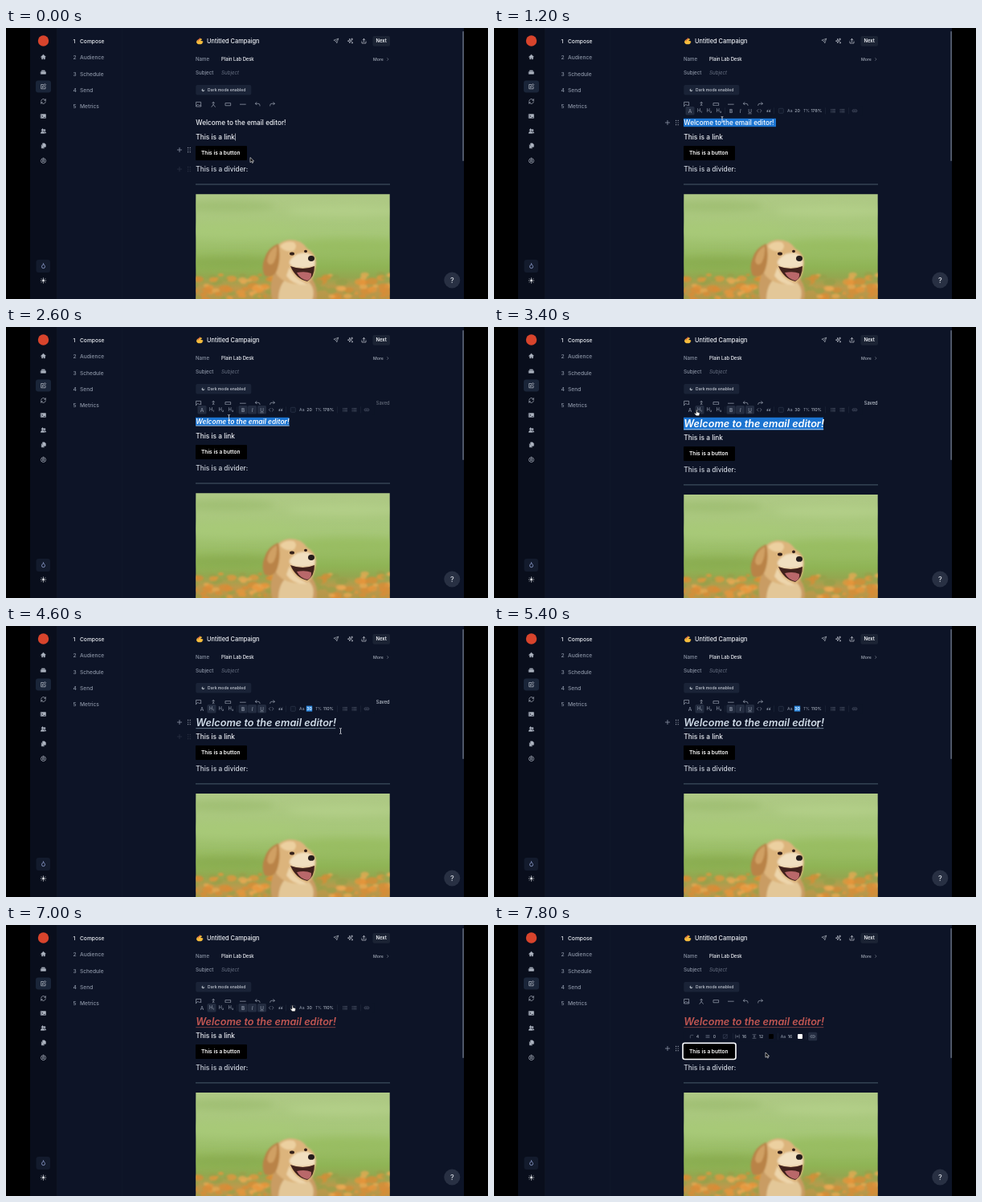
Recreate the animation shown at these times as an HTML page. Size 600 by 338 pixels, loop 8 s.

```html
<!DOCTYPE html>
<html lang="en">
<head>
<meta charset="utf-8">
<title>Email editor</title>
<style>
html, body { margin: 0; width: 100%; height: 100%; overflow: hidden; background: #000; }
svg { display: block; width: 600px; height: 338px; font-family: Inter, sans-serif; }
text { white-space: pre; }
</style>
</head>
<body>
<svg id="stage" viewBox="0 0 600 338"></svg>
<script>
const PAGE = '#0d1427', WHITE = '#eef1f6', GREY = '#8b94a5', DIM = '#596275', BLUE = '#1b74d1';

const ICONS = {
  home: 'M3 12 12 3l9 9h-3v9h-4v-6h-4v6H6v-9z',
  box: 'M2 11h20v9H2zM6 5h12v3H6z',
  edit: 'M11 4H3v17h17v-8M19 2l3 3-10 10-4 1 1-4z',
  refresh: 'M3 11a9 9 0 0 1 15-6l3 3M21 3v5h-5M21 13a9 9 0 0 1-15 6l-3-3M3 21v-5h5',
  screen: 'M2 4h20v16H2z',
  users: 'M9 4a4 4 0 1 1-.1 0zM2 20q0-6 7-6t7 6zM17 6a3 3 0 1 1-.1 0zM19 15q3 1 3 5h-3z',
  copy: 'M10 2h7l4 4v10H10zM5 8v13h10',
  buoy: 'M12 2a10 10 0 1 0 .1 0zM12 8a4 4 0 1 0 .1 0zM5 5l4 4M15 15l4 4M19 5l-4 4M9 15l-4 4',
  flame: 'M12 3c1 4 6 6 6 11a6 6 0 0 1-12 0c0-3 2-4 2-6 2 1 3 2 4-5z',
  sun: 'M12 8a4 4 0 1 0 .1 0zM12 1v3M12 20v3M1 12h3M20 12h3M4 4l2 2M18 18l2 2M20 4l-2 2M6 18l-2 2',
  moon: 'M20 14A9 9 0 1 1 10 4a7 7 0 0 0 10 10z',
  send: 'M22 2 11 13M22 2l-7 20-4-9-9-4z',
  sparkle: 'M10 4l2 6 6 2-6 2-2 6-2-6-6-2 6-2zM19 2v6M16 5h6M20 17v4M18 19h4',
  upload: 'M4 14v7h16v-7M12 16V3M7 8l5-5 5 5',
  image: 'M3 3h18v18H3zM3 18l6-6 5 5 3-3 4 4',
  merge: 'M5 22l7-9 7 9M12 13V3M8 7l4-4 4 4',
  pill: 'M2 7h20v10H2z',
  dash: 'M1 12h22',
  undo: 'M8 4 3 9l5 5M3 9h11a7 7 0 0 1 7 7v2',
  redo: 'M16 4l5 5-5 5M21 9H10a7 7 0 0 0-7 7v2',
  code: 'M8 6l-6 6 6 6M16 6l6 6-6 6',
  quote: 'M9 6q-6 2-6 11h5v-6H4M20 6q-6 2-6 11h5v-6h-4',
  list: 'M9 6h12M9 12h12M9 18h12M3 6h2M3 12h2M3 18h2',
  link: 'M8 12h8M10 7H7a5 5 0 0 0 0 10h3M14 7h3a5 5 0 0 1 0 10h-3',
  corner: 'M4 21V10q0-6 6-6h11',
  lines: 'M3 6h18M3 12h18M3 18h18',
  slash: 'M3 3h18v18H3zM3 21 21 3',
  padX: 'M3 4v16M21 4v16M8 12h8M12 9v6',
  padY: 'M4 3h16M4 21h16M12 7v10M9 12h6',
  chevron: 'M9 5l7 7-7 7'
};

const text = (x, cy, size, str, fill = WHITE, weight = 500, extra = '') =>
  `<text x="${x}" y="${cy + size * .36}" font-size="${size}" fill="${fill}" font-weight="${weight}" ${extra}>${str}</text>`;
const mid = (x, cy, size, str, fill, weight, extra = '') =>
  text(x, cy, size, str, fill, weight, `text-anchor="middle" ${extra}`);
const rect = (x, y, w, h, fill, r = 0, extra = '') =>
  `<rect x="${x}" y="${y}" width="${w}" height="${h}" rx="${r}" fill="${fill}" ${extra}/>`;
const icon = (name, cx, cy, size = 7, color = GREY, fill = 'none') =>
  `<path d="${ICONS[name]}" transform="translate(${cx - size / 2} ${cy - size / 2}) scale(${size / 24})"
    fill="${fill}" stroke="${color}" stroke-width="2.2" stroke-linejoin="round" stroke-linecap="round"/>`;
const solid = (name, cx, cy, size, color) => icon(name, cx, cy, size, color, color);
const group = (id, content, extra = '') => `<g id="${id}" ${extra}>${content}</g>`;
const rule = (x, cy) => rect(x, cy - 4, .5, 8, '#222b3e');

function sidebar() {
  const c = '#adb4c0';
  return rect(30, 0, 34, 338, '#090e1c') + rect(63.5, 0, .6, 338, '#151d2f') +
    '<circle cx="46.5" cy="16" r="6.7" fill="#d8442c"/>' +
    rect(37, 65.5, 19, 15, '#1a2539', 3) + rect(37.5, 289, 17.5, 16, '#131b2d', 3) +
    solid('home', 46.5, 36, 7.5, c) + solid('box', 46.5, 55, 7, c) + icon('edit', 46.5, 73, 7.5, '#c5cad3') +
    icon('refresh', 46.5, 91.5, 7.5, c) + solid('screen', 46.5, 110, 7, c) +
    '<path d="M44.5 108.7l1.3 1.3-1.3 1.3M46.8 111.6h2" fill="none" stroke="#090e1c" stroke-width=".7"/>' +
    solid('users', 46.5, 128.5, 7.5, c) + solid('copy', 46.5, 147, 7.5, c) + icon('buoy', 46.5, 165.5, 7.5, c) +
    icon('flame', 46.5, 297, 8, '#9fb0e2') + solid('sun', 46.5, 315, 7, WHITE);
}

function steps() {
  return ['Compose', 'Audience', 'Schedule', 'Send', 'Metrics'].map((name, i) => {
    const y = 17 + i * 20.1, color = i ? GREY : WHITE;
    return text(83.5, y, 6.65, i + 1, color) + text(92, y, 6.65, name, color);
  }).join('') + rect(144, 0, .5, 338, '#121a2d');
}

function header() {
  const tools = ['image', 'merge', 'pill', 'dash', 'undo', 'redo'];
  return '<path d="M237 18q0-3 3-4l3-1 1 1.4-2 1.4 3 .6q1 1-.3 1.6l-.4 1.4q-3 1.6-6 .4z" fill="#f5bd3d"/>' +
    '<path d="M238.6 16.5l3-4" stroke="#d95a42" stroke-width="1.1"/>' +
    text(250, 16.2, 7.4, 'Untitled Campaign') +
    icon('send', 411, 16.2, 6.5, '#b4bac5') + icon('sparkle', 428.5, 16.2, 7.5, '#c8cdd6') +
    icon('upload', 445.5, 16.2, 7.5, '#c8cdd6') + rect(456.5, 10, 21.5, 12.8, '#1b2334', 2) +
    mid(467.2, 16.3, 5.9, 'Next', WHITE, 600) +
    text(236, 39.3, 6.1, 'Name', GREY) + text(268, 39, 5.8, 'Plain Lab Desk') +
    text(457, 39, 5.2, 'More', '#a5adba') + icon('chevron', 475.3, 39, 5, '#a5adba') +
    text(236, 56, 6.2, 'Subject', GREY) + text(268, 56, 6.2, 'Subject', '#6a7385', 400, 'font-style="italic"') +
    rect(236.3, 71, 69, 12.6, '#1a2337', 2) + solid('moon', 245.5, 77.3, 4.2, '#b4bac5') +
    text(251, 77.3, 5.05, 'Dark mode enabled', '#b4bac5', 600) +
    tools.map((name, i) => icon(name, 239.8 + i * 18.35, 95.2, 7.5, '#a0a8b6')).join('') +
    text(460.8, 94.5, 5.7, 'Saved', '#b9c0cb', 500, 'id="saved" opacity="0"');
}

function seeded(seed) {
  return () => (seed = (seed * 16807) % 2147483647) / 2147483647;
}

function meadow() {
  const rnd = seeded(41);
  let flowers = '';
  for (let i = 0; i < 130; i++) {
    const x = 232 + rnd() * 250, y = 307 + rnd() * 34, r = 1.5 + rnd() * 3;
    const color = ['#e8963a', '#dd8a34', '#eba952', '#97a04a'][Math.floor(rnd() * 4)];
    flowers += `<ellipse cx="${x}" cy="${y}" rx="${r * 1.7}" ry="${r}" fill="${color}" opacity=".7"/>`;
  }
  return rect(236, 207, 242, 140, 'url(#meadow)') +
    `<g filter="url(#haze)">
      <ellipse cx="275" cy="222" rx="60" ry="7" fill="#98b96a" opacity=".6"/>
      <ellipse cx="420" cy="228" rx="70" ry="7" fill="#b8d48e" opacity=".6"/>
      <ellipse cx="290" cy="252" rx="70" ry="9" fill="#a9cb78" opacity=".7"/>
      <ellipse cx="430" cy="272" rx="70" ry="9" fill="#97bd5e" opacity=".7"/>
      <ellipse cx="280" cy="292" rx="60" ry="7" fill="#86a94c" opacity=".7"/>
    </g><g filter="url(#soft)">${flowers}</g>`;
}

function dog() {
  return `<g filter="url(#fur)">
      <path d="M332 340Q326 322 335 303L378 309Q390 322 386 340Z" fill="#c99c63"/>
      <path d="M339 340Q339 320 350 312L377 317Q386 326 381 340Z" fill="#e3c798"/>
      <path d="M333 281Q337 266 353 264Q368 264 375 275Q386 281 386 292Q385 314 374 319Q350 322 338 309Q331 297 333 281Z" fill="#dcb47c"/>
      <path d="M341 272Q348 265 358 267Q364 271 358 278Q346 280 341 272Z" fill="#ecd0a0"/>
      <path d="M356 287Q364 279 376 281Q387 287 384 297Q371 301 357 298Q349 293 356 287Z" fill="#f1dfc0"/>
      <path d="M353 298Q358 312 371 317L375 320Q358 322 349 309Z" fill="#edd5ac"/>
      <path d="M339 269Q326 274 322 287Q317 299 322 309Q332 313 337 303Q343 287 339 269Z" fill="#b98347"/>
      <path d="M337 272Q327 277 325 290Q327 298 333 293Q338 284 337 272Z" fill="#d0a064"/>
    </g><g filter="url(#fine)">
      <path d="M354 297Q370 303 384 297Q384 311 375 316Q361 313 354 297Z" fill="#40211c"/>
      <path d="M362 305Q373 303 380 306Q381 313 375 315Q366 313 362 305Z" fill="#b9686a"/>
      <ellipse cx="356" cy="281.5" rx="3" ry="2" fill="#35211a"/>
      <ellipse cx="373" cy="278.5" rx="2" ry="1.8" fill="#35211a"/>
      <ellipse cx="380" cy="287.5" rx="4" ry="3.4" fill="#241c1c"/>
    </g>`;
}

function editorBody() {
  return group('linkText', text(236.3, 136, 8.3, 'This is a link')) +
    rect(285.3, 131.5, .6, 9, WHITE, 0, 'id="caret"') +
    rect(236, 147, 64, 18, '#000', 1) +
    rect(235, 145.4, 66, 20.2, 'none', 2.5, 'id="ring" stroke="#fff" stroke-width="1.6"') +
    text(243, 156, 6.6, 'This is a button', '#fff', 600) +
    text(236.3, 175.8, 8.35, 'This is a divider:', '#cfd5df') +
    rect(236, 194.6, 242, .8, '#576d7a') + `<g clip-path="url(#frame)">${meadow()}${dog()}</g>`;
}

function formatBar() {
  const y = 103.3, c = '#858e9f';
  const marks = [['A', 244], ['H₁', 256], ['H₂', 268], ['H₃', 280], ['B', 295], ['I', 306.5], ['U', 318.5]];
  const style = { I: 'font-style="italic"', U: 'text-decoration="underline"' };
  return rect(236.5, 97, 222, 13, PAGE, 2) +
    marks.map(([label, x]) => rect(x - 5.5, y - 5.3, 11, 10.6, '#232c40', 1.5, `class="mark" data-key="${label}"`) +
      mid(x, y, label[0] === 'H' ? 5.8 : 6.4, label, c, label === 'B' ? 700 : 500, style[label])).join('') +
    icon('code', 330.2, y, 7, c) + solid('quote', 342, y, 6, c) +
    rect(354.3, y - 3, 6, 6, '#10182b', 1, 'stroke="#333d51" stroke-width=".6"') +
    mid(368.3, y, 5, 'Aa', c) + rect(373.8, y - 3.7, 7.4, 7, '#2f8ae0', 0, 'id="sizeSel"') +
    mid(377.5, y, 5.3, '20', '#a9b1be', 500, 'id="size"') + mid(389, y, 4.6, 'T%', c) +
    mid(401.3, y, 5.3, '178%', '#a9b1be', 500, 'id="leading"') +
    icon('list', 422, y, 7, DIM) + icon('list', 433.5, y, 7, DIM) + icon('link', 449, y, 7, DIM) +
    rule(287.3, y) + rule(348.5, y) + rule(412, y) + rule(441, y);
}

function buttonBar() {
  const y = 139, c = '#858e9f', num = (x, n) => mid(x, y, 5.2, n, '#a9b1be');
  return rect(236.5, 132, 169, 13.5, PAGE, 2) + rect(391.2, y - 5.3, 11, 10.6, '#232c40', 1.5) +
    icon('corner', 246, y, 5, c) + num(253.5, 4) + icon('lines', 266, y, 5.5, c) + num(274.5, 0) +
    icon('slash', 288, y, 6, '#424c60') + rule(297, y) + icon('padX', 303, y, 6, c) + num(311.5, 16) +
    icon('padY', 324, y, 6, c) + num(332.5, 12) + rect(342, y - 3, 6, 6, '#000', 1) + rule(353, y) +
    mid(360, y, 5, 'Aa', c) + num(368.5, 16) + rect(378, y - 3, 6, 6, '#fff', 1) + rule(388, y) +
    icon('link', 396.7, y, 7, c);
}

function rowHandle(id) {
  let dots = '';
  for (let i = 0; i < 6; i++) dots += rect(226 + (i % 2) * 2.6, -3.2 + (i >> 1) * 2.6, 1.2, 1.2, '#a0a8b6', .5);
  return group(id, '<path d="M213 0h6M216 -3v6" stroke="#8b94a5" stroke-width=".8"/>' + dots);
}

const pointers = {
  arrow: '<path d="M0 0v6.2l1.6-1.4 1 2.2 1-.5-1-2.1h2z" fill="#000" stroke="#fff" stroke-width=".6"/>',
  ibeam: '<path d="M-1.3 -3.5q1.3 0 1.3 1v5q0 1-1.3 1M1.3 -3.5q-1.3 0-1.3 1M0 2.5q0 1 1.3 1" fill="none" stroke="#e8ebf0" stroke-width=".8"/>',
  hand: '<path d="M-1 -3.4q.8-.7 1.3 0v2.5l2.5.6q.9.4.7 1.5l-.7 2.6h-3.5l-2.6-3q.3-1 1.4-.4l.9.7z" fill="#fff" stroke="#000" stroke-width=".5"/>'
};

const blur = (id, amount) => `<filter id="${id}"><feGaussianBlur stdDeviation="${amount}"/></filter>`;
const stage = document.getElementById('stage');
stage.innerHTML = `<defs>
    <linearGradient id="meadow" x1="0" y1="0" x2="0" y2="1">
      <stop offset="0" stop-color="#afc986"/><stop offset=".35" stop-color="#a6c778"/>
      <stop offset=".65" stop-color="#8fb455"/><stop offset=".74" stop-color="#93a750"/>
      <stop offset=".84" stop-color="#bd994b"/><stop offset="1" stop-color="#ad9548"/>
    </linearGradient>
    ${blur('haze', 5)}${blur('soft', 1.3)}${blur('fur', .8)}${blur('fine', .35)}
    <clipPath id="frame"><rect x="236.3" y="207.2" width="241.4" height="140"/></clipPath>
  </defs>` +
  rect(0, 0, 600, 338, '#000') + rect(30, 0, 540, 338, PAGE) + sidebar() + steps() + header() +
  rect(236, 112.8, 115, 10.4, BLUE, 0, 'id="selection"') +
  '<text id="title" x="236.3">Welcome to the email editor!</text>' +
  rect(236.3, 0, 0, .7, '#fff', 0, 'id="underline"') +
  group('below', editorBody()) + rowHandle('row') + rowHandle('ghost') +
  group('formatBar', formatBar()) + group('buttonBar', buttonBar()) +
  rect(568.4, 4, 1.4, 162, '#6b7486', .7) +
  '<circle cx="555.3" cy="314.5" r="10" fill="#283043"/>' + mid(555.3, 314.6, 9, '?', '#d7dbe2', 500) +
  group('pointer', Object.entries(pointers).map(([id, shape]) => group(id, shape)).join(''));

const el = Object.fromEntries([...stage.querySelectorAll('[id]')].map(node => [node.id, node]));
const marks = [...stage.querySelectorAll('.mark')];
const show = (node, on) => node.setAttribute('visibility', on ? 'inherit' : 'hidden');
const set = (node, attrs) => { for (const k in attrs) node.setAttribute(k, attrs[k]); };

const LOOP = 8000, TICK = 200;
// time, x, y, pointer
const path = [
  [0, 304, 161.5, 'arrow'], [200, 300, 150, 'hand'], [400, 291, 130, 'ibeam'], [600, 284, 116, 'ibeam'],
  [1200, 284, 114, 'ibeam'], [1600, 295, 105, 'hand'], [2000, 306, 105, 'hand'], [2200, 318, 105, 'hand'],
  [2400, 299, 109, 'hand'], [2600, 277.5, 113, 'ibeam'], [3000, 256, 106, 'hand'], [3400, 252.5, 107, 'hand'],
  [3600, 262, 107, 'hand'], [4000, 375, 104, 'ibeam'], [4200, 377, 104, 'ibeam'], [4600, 416.5, 131, 'ibeam'],
  [5200, 416.5, 131, 'ibeam'], [5800, 377, 106, 'ibeam'], [6200, 364.5, 104, 'ibeam'], [6400, 357, 104, 'hand'],
  [7000, 357, 104, 'hand'], [7400, 276, 156, 'hand'], [7600, 290, 158, 'hand'], [7800, 338, 159, 'arrow']
];
// time, row y, fading row y
const rows = [[0, 152, 176], [400, 136, 152], [600, 118, 136], [800, 118], [1400], [4600, 120, 138], [4800, 120], [5800], [7400, 154]];
const fades = [[0, 0], [2400, 0], [2800, 1], [5000, 1], [5400, 0], [8000, 0]];

const segment = (table, t) => {
  const i = table.findLastIndex(k => k[0] <= t), a = table[i], b = table[i + 1] || a;
  const p = b === a ? 0 : (t - a[0]) / (b[0] - a[0]);
  return { a, at: n => a[n] + (b[n] - a[n]) * p };
};

function placeRow(node, y, opacity) {
  show(node, y !== undefined);
  if (y !== undefined) set(node, { transform: `translate(0 ${y})`, opacity });
}

function render(now) {
  const t = Math.floor((now % LOOP) / TICK) * TICK;
  const from = start => t >= start, during = (start, end) => t >= start && t < end;
  const bold = from(1600), italic = from(2000), under = from(2200), big = from(3000), red = from(6800);
  const selected = during(800, 4200), chosen = from(7400);
  const size = big ? 12.68 : bold ? 8.45 : 8.25, titleY = big ? 120.3 : 118;
  const width = big ? 174 : italic ? 116.5 : 115;

  set(el.title, {
    y: titleY + size * .36, 'font-size': size, 'font-weight': bold ? 600 : 500,
    'font-style': italic ? 'italic' : 'normal',
    fill: red ? '#c25652' : selected ? '#fff' : big ? '#d0dce8' : WHITE
  });
  show(el.underline, under);
  set(el.underline, { y: titleY + size * .56, width, fill: red ? '#a04a48' : selected ? '#d5e4f5' : '#91a9bb' });
  show(el.selection, selected);
  set(el.selection, { width, height: big ? 15.6 : 10.4 });
  set(el.below, { transform: `translate(0 ${big ? 1.9 : 0})` });
  show(el.caret, t < 600);
  show(el.ring, chosen);
  show(el.linkText, !chosen);

  show(el.formatBar, during(1000, 7400));
  show(el.buttonBar, chosen);
  const active = { 'A': !big, 'H₁': big, 'B': bold, 'I': italic, 'U': under };
  marks.forEach(m => set(m, { opacity: active[m.dataset.key] ? 1 : 0 }));
  el.size.textContent = big ? '30' : '20';
  el.leading.textContent = big ? '110%' : '178%';
  set(el.sizeSel, { opacity: during(4200, 6400) ? 1 : 0 });
  set(el.size, { fill: during(4200, 6400) ? '#fff' : '#a9b1be' });
  set(el.saved, { opacity: segment(fades, t).at(1) });

  const [, rowY, ghostY] = segment(rows, t).a;
  placeRow(el.row, rowY, 1);
  placeRow(el.ghost, ghostY, .22);

  const move = segment(path, t);
  set(el.pointer, { transform: `translate(${move.at(1)} ${move.at(2)})` });
  for (const kind in pointers) show(el[kind], kind === move.a[3]);
}

const start = performance.now();
function frame() {
  render(performance.now() - start);
  requestAnimationFrame(frame);
}
frame();
</script>
</body>
</html>
```
